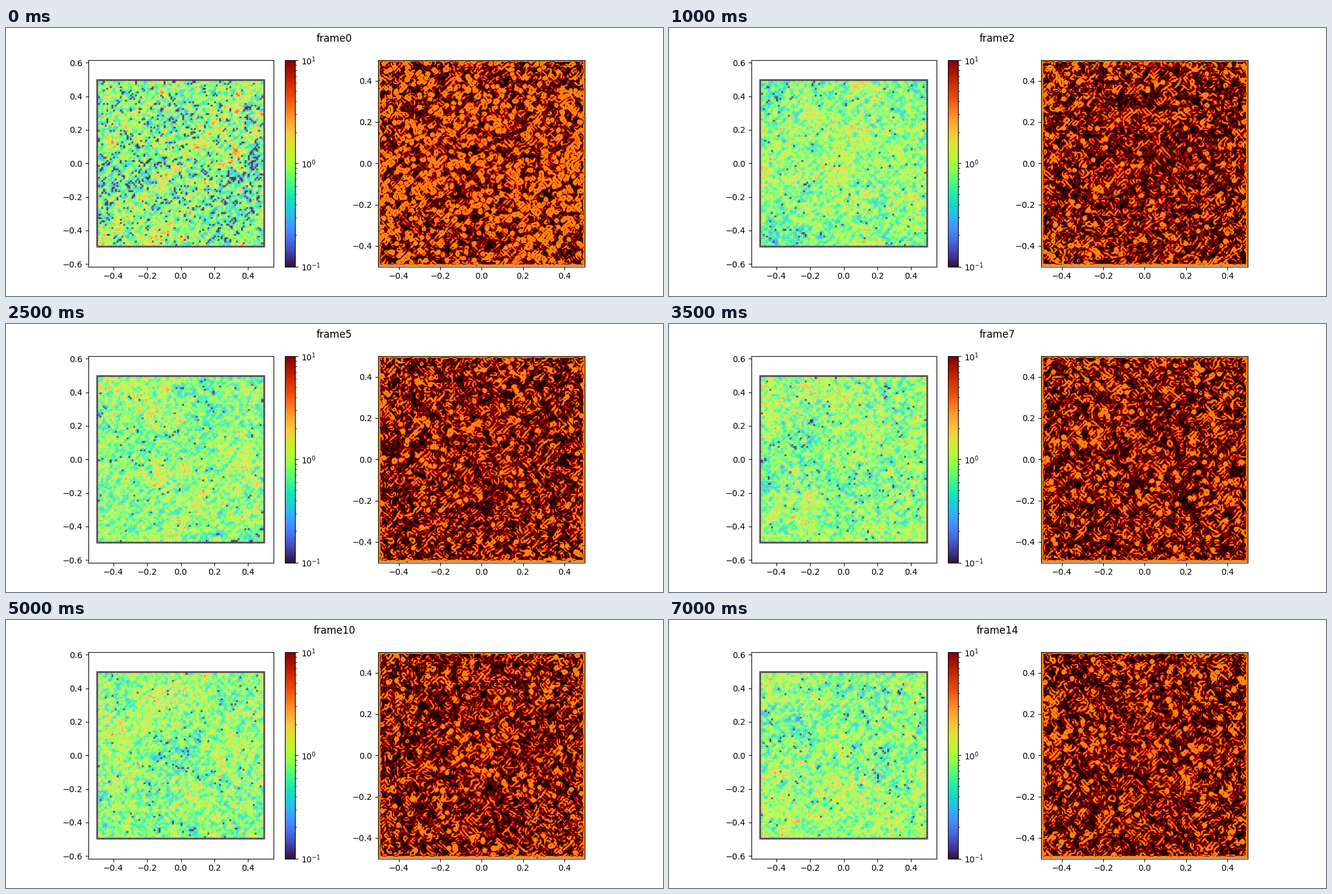
Recreate the animation shown at these times as a matplotlib script. Size 1100 by 450 pixels, loop 7.5 s.

```python
import numpy as np
import matplotlib.pyplot as plt
from matplotlib.animation import FuncAnimation
from matplotlib.cm import ScalarMappable
from matplotlib.colors import LogNorm
from matplotlib.ticker import MultipleLocator

N = 100          # nodes per side
M = 346          # pixels per side of the right-hand map
FRAMES = 15
FLOOR = -1.2     # log10 value of empty nodes and of the rim

axis = np.linspace(-0.495, 0.495, N)
X, Y = np.meshgrid(axis, axis)
freq = 2 * np.pi * np.fft.fftfreq(N)
KX, KY = np.meshgrid(freq, freq)
KU, KV = (KX + KY) / np.sqrt(2), (KX - KY) / np.sqrt(2)
RIM = np.maximum(abs(X), abs(Y)) > 0.494
ORDER = np.argsort(~RIM.ravel(), kind="stable")   # rim nodes drawn first


def noise(rng, along, across):
    """Unit-variance noise with correlation lengths on the two diagonals."""
    spec = np.fft.fft2(rng.standard_normal((N, N)))
    spec *= np.exp(-((KU * along) ** 2 + (KV * across) ** 2) / 2)
    out = np.fft.ifft2(spec).real
    return (out - out.mean()) / out.std()


def cubic_weights():
    """Matrix that resamples N nodes to M pixels with a cubic kernel."""
    pos = np.linspace(0.3, N - 1.3, M)
    t = np.abs(pos[:, None] - np.arange(N)[None, :])
    near = 1.5 * t**3 - 2.5 * t**2 + 1
    far = -0.5 * t**3 + 2.5 * t**2 - 4 * t + 2
    w = np.where(t < 1, near, np.where(t < 2, far, 0))
    return w / w.sum(axis=1, keepdims=True)


W = cubic_weights()


def log_field(i):
    rng = np.random.default_rng(100 + i)
    texture = (0.75 * noise(rng, 0.5, 0.5)
               + 0.5 * noise(rng, 1.8, 0.4)
               + 0.4 * noise(rng, 0.4, 1.8))
    broad = noise(rng, 8, 8)
    if i == 0:
        f = -0.18 + 0.22 * texture + 0.04 * broad
        for offset in (0.0, -0.27, -0.83, 0.55):
            f += 0.22 * np.exp(-((Y - X - offset) / 0.06) ** 2)
        holes = 900
    else:
        f = -0.09 + 0.17 * texture + 0.05 * broad
        holes = 150
    rank = np.argsort((f + 0.25 * rng.standard_normal((N, N))).ravel())
    f.flat[rank[:holes]] = FLOOR
    f[RIM] = FLOOR
    return f


def slope_map(f, i):
    gy, gx = np.gradient(W @ f @ W.T)
    g = np.hypot(gx, gy)
    top = np.percentile(g, 60 if i == 0 else 78)
    return 0.765 * np.minimum(g / top, 1) ** 1.7


fig, (left, right) = plt.subplots(1, 2, figsize=(11, 4.5), dpi=100)
norm = LogNorm(0.1, 10)

dots = left.scatter(X.ravel()[ORDER], Y.ravel()[ORDER], c=np.ones(N * N),
                    s=6, marker="x", linewidths=1.0, alpha=0.8,
                    cmap="turbo", norm=norm)
fig.colorbar(ScalarMappable(norm, "turbo"), ax=left)
half = 0.55 * 346.5 / 310
left.set(xlim=(-0.55, 0.55), ylim=(-half, half))

image = right.imshow(np.zeros((M, M)), cmap="gist_heat", vmin=0, vmax=1,
                     origin="lower", extent=(-0.5, 0.5, -0.5, 0.5))
for ax in (left, right):
    ax.xaxis.set_major_locator(MultipleLocator(0.2))
    ax.yaxis.set_major_locator(MultipleLocator(0.2))

title = fig.suptitle("frame0")


def draw(i):
    f = log_field(i)
    dots.set_array(10 ** f.ravel()[ORDER])
    image.set_data(slope_map(f, i))
    title.set_text(f"frame{i}")
    return dots, image, title


anim = FuncAnimation(fig, draw, frames=FRAMES, interval=500,
                     repeat=True, repeat_delay=0, blit=False)
plt.show()
```
